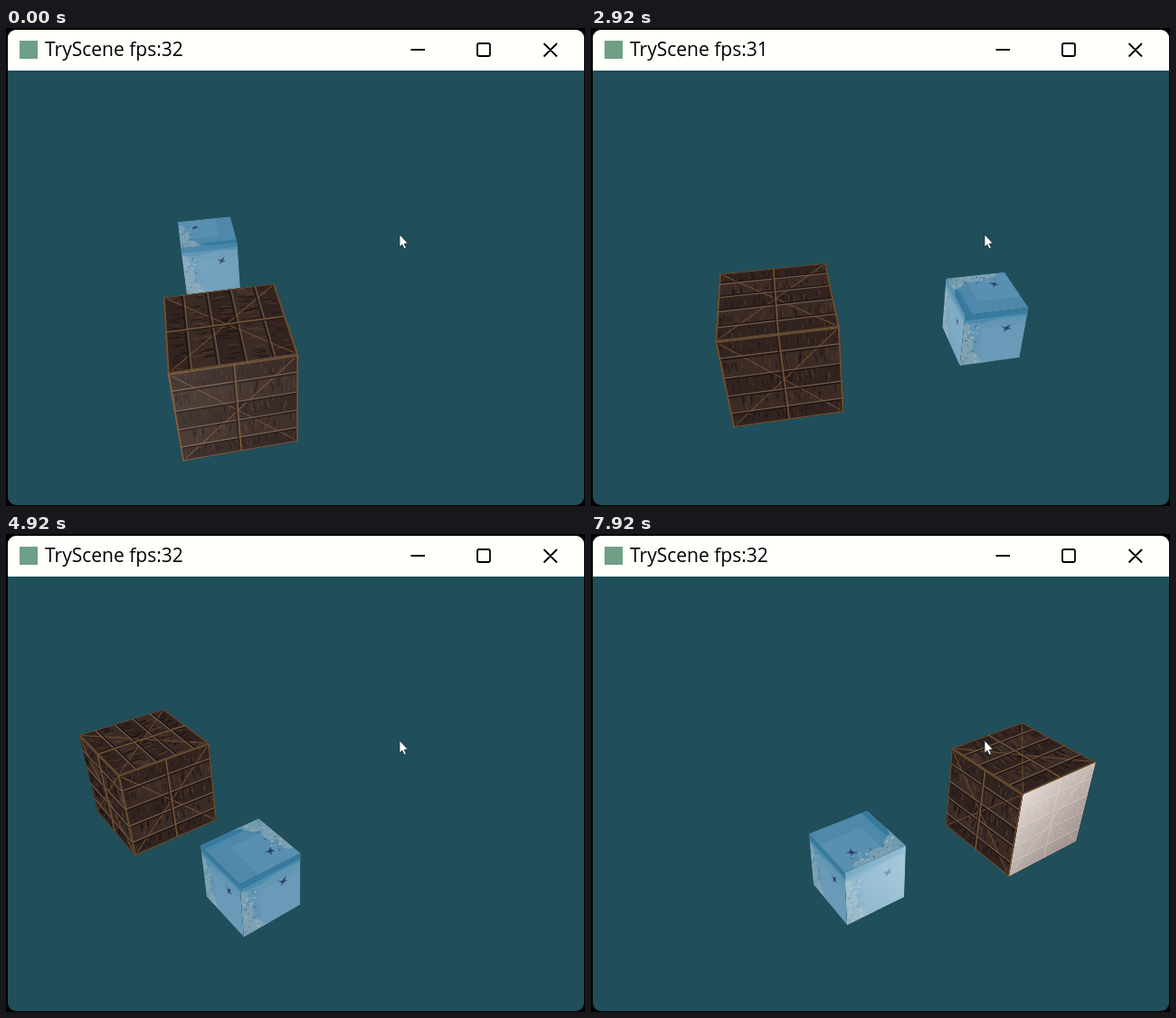
An HTML page with a canvas for the animation above (8000 ms loop, 640 by 528 pixels).

```html
<!DOCTYPE html>
<html lang="en">
<head>
<meta charset="utf-8">
<title>TryScene</title>
<style>
html, body { margin: 0; width: 100%; height: 100%; overflow: hidden; background: #000; }
canvas { display: block; width: 640px; height: 528px; }
</style>
</head>
<body>
<canvas id="stage" width="640" height="528"></canvas>
<script>
const ctx = document.getElementById('stage').getContext('2d');
const LOOP = 8000, STEP = LOOP / 96, RAD = Math.PI / 180;

// Camera: fixed pitch and height, turning steadily around the boxes
const FOCAL = 636, CX = 320, CY = 287, CAM_H = 3.53;
const SIN = Math.sin(34.7 * RAD), COS = Math.cos(34.7 * RAD);
const TURN_START = 167.5, TURN_RATE = 31.4;
const BOXES = [{ side: 1.02, offset: 1, wood: true }, { side: 0.62, offset: -1, wood: false }];

// Sideways and depth position of the scene centre: [seconds, value]
const SIDE = [[0, -.8], [.9, .2], [1.83, .34], [2.5, .3], [2.92, .04], [4.17, -.32],
  [4.92, -1.01], [6.17, .47], [7.92, .62], [8, .62]];
const DEPTH = [[0, 4.8], [.92, 4.87], [1.83, 4.58], [2.92, 4.38], [4.17, 4.36],
  [4.92, 4.6], [6.17, 4.74], [7.92, 4.5], [8, 4.48]];

// Monotone cubic through the keys
function track(keys, t) {
  let i = 0;
  while (i < keys.length - 2 && t >= keys[i + 1][0]) i++;
  const slope = k => (keys[k + 1][1] - keys[k][1]) / (keys[k + 1][0] - keys[k][0]);
  const tangent = k => {
    if (k === 0) return slope(0);
    if (k === keys.length - 1) return slope(k - 1);
    const a = slope(k - 1), b = slope(k);
    return a * b <= 0 ? 0 : 2 * a * b / (a + b);
  };
  const [t0, p0] = keys[i], [t1, p1] = keys[i + 1], d = t1 - t0;
  const s = (t - t0) / d, s2 = s * s, s3 = s2 * s;
  return p0 * (2 * s3 - 3 * s2 + 1) + p1 * (3 * s2 - 2 * s3)
    + d * (tangent(i) * (s3 - 2 * s2 + s) + tangent(i + 1) * (s3 - s2));
}

function random(seed) {
  return () => (seed = (seed * 16807) % 2147483647) / 2147483647;
}

const heading = deg => [Math.sin(deg * RAD), Math.cos(deg * RAD)];

function project(x, y, z) {
  const d = z * COS - y * SIN;
  return [CX + FOCAL * x / d, CY - FOCAL * (y * COS + z * SIN) / d];
}

function trace(at, pts) {
  ctx.beginPath();
  for (const [u, v] of pts) ctx.lineTo(...at(u, v));
  ctx.closePath();
}

function shape(at, pts, color) {
  trace(at, pts);
  ctx.fillStyle = color;
  ctx.fill();
}

function line(at, u0, v0, u1, v1, color, width = 1) {
  ctx.beginPath();
  ctx.moveTo(...at(u0, v0));
  ctx.lineTo(...at(u1, v1));
  ctx.strokeStyle = color;
  ctx.lineWidth = width;
  ctx.stroke();
}

const box = (u0, v0, u1, v1) => [[u0, v0], [u1, v0], [u1, v1], [u0, v1]];
const WHOLE = box(0, 0, 1, 1);
const ROWS = [0.02, 0.18, 0.4, 0.61, 0.82, 0.98];

const rndGrain = random(71);
const GRAIN = Array.from({ length: 170 }, () => {
  const row = Math.floor(rndGrain() * 5), h = ROWS[row + 1] - ROWS[row];
  const v = ROWS[row] + h * rndGrain() * 0.5;
  return { u: 0.03 + rndGrain() * 0.94, v, end: v + h * (0.2 + rndGrain() * 0.3), tone: rndGrain() };
});

function woodFace(at) {
  shape(at, WHOLE, '#3a2b25');
  for (let i = 0; i < 5; i += 2) shape(at, box(0, ROWS[i], 1, ROWS[i + 1]), 'rgba(20,13,12,.25)');
  for (const g of GRAIN) {
    const color = g.tone < 0.55 ? 'rgba(22,15,14,.5)' : 'rgba(98,72,58,.45)';
    line(at, g.u, g.v, g.u, g.end, color, 1.3);
  }
  line(at, 0.03, 0.03, 0.97, 0.97, '#67492f', 1.2);
  line(at, 0.97, 0.03, 0.03, 0.97, '#67492f', 1.2);
  for (const v of ROWS.slice(1, 5)) {
    line(at, 0, v + 0.018, 1, v + 0.018, '#1d1413', 1.3);
    line(at, 0, v, 1, v, '#775d4b', 1.1);
  }
  line(at, 0.485, 0, 0.485, 1, '#241917', 1.2);
  line(at, 0.5, 0, 0.5, 1, '#765638', 1.5);
  for (const b of [box(0, 0, 1, .015), box(0, .985, 1, 1), box(0, 0, .015, 1), box(.985, 0, 1, 1)]) {
    shape(at, b, '#72502f');
  }
}

const rndFoam = random(19);
const FOAM = [[0, 0.16]];
for (let i = 0; i <= 14; i++) {
  const s = i / 14;
  FOAM.push([0.05 + 0.13 * rndFoam() + 0.28 * s ** 5, 0.16 + 0.8 * s]);
}
FOAM.push([0.5, 1], [0, 1]);
const SPECKS = Array.from({ length: 22 }, () => {
  const v = 0.2 + rndFoam() * 0.75;
  return { u: 0.02 + rndFoam() * 0.2, v, w: 0.02 + rndFoam() * 0.06, h: 0.02 + rndFoam() * 0.04, tone: rndFoam() };
});
const BIRD = [[-.1, -.05], [-.02, -.01], [.07, -.08], [.05, .01], [.1, .04], [.02, .05], [-.04, .1], [-.03, .03]];

function iceFace(at, isTop) {
  shape(at, WHOLE, isTop ? '#5088aa' : '#6496b4');
  shape(at, box(0, 0, 1, 0.11), '#377a9e');
  shape(at, [[0, .11], [1, .09], [1, .15], [.6, .14], [.3, .19], [0, .16]], 'rgba(70,138,172,.8)');
  shape(at, box(0.3, 0.3, 1, 1), 'rgba(126,172,198,.2)');
  const foamAt = isTop ? (u, v) => at(1 - u, 1 - v) : at;
  shape(foamAt, FOAM, 'rgba(134,164,178,.75)');
  for (const s of SPECKS) {
    const color = s.tone < 0.5 ? 'rgba(62,102,128,.7)' : 'rgba(178,192,196,.7)';
    shape(foamAt, [[s.u, s.v], [s.u + s.w, s.v + s.h * .4], [s.u + s.w * .4, s.v + s.h]], color);
  }
  const bu = 0.69, bv = isTop ? 0.7 : 0.34;
  shape(at, BIRD.map(([u, v]) => [bu + u * .85, bv + v * .85]), '#3a5580');
  shape(at, BIRD.map(([u, v]) => [bu + u * .45, bv + v * .45]), '#283558');
}

// Highlight from how closely the reflected light meets the eye
function glint(normal, light, x, z) {
  const view = 180 + Math.atan2(x, z) / RAD;
  const off = ((2 * normal - light - view) % 360 + 540) % 360 - 180;
  return Math.exp(-Math.pow(Math.abs(off) / 22, 1.5));
}

// The highlight fades from the brighter top corner to the opposite bottom one
function shine(at, wood, [left, right]) {
  const near = left > right ? 0 : 1;
  const g = ctx.createLinearGradient(...at(near, 0), ...at(1 - near, 1));
  const tint = wood ? '244,234,229' : '224,243,252';
  const alpha = s => wood ? 0.92 * s : 0.85 * s ** 0.8;
  g.addColorStop(0, `rgba(${tint},${alpha(Math.max(left, right))})`);
  g.addColorStop(1, `rgba(${tint},${alpha(Math.min(left, right)) * 0.7})`);
  shape(at, WHOLE, g);
}

function paintFace(b, at, isTop, light) {
  ctx.save();
  trace(at, WHOLE);
  ctx.clip();
  if (b.wood) woodFace(isTop ? (u, v) => at(v, u) : at);
  else iceFace(at, isTop);
  if (light) shine(at, b.wood, light);
  ctx.restore();
}

function paintBox(b, turn) {
  const { x, z, side } = b, top = -CAM_H + side / 2;
  for (let j = 0; j < 4; j++) {
    const normal = turn + 90 * j;
    const n = heading(normal), r = heading(normal - 90);
    const fx = x + n[0] * side / 2, fz = z + n[1] * side / 2;
    if (n[0] * fx + n[1] * fz >= 0) continue;
    const ground = u => [fx + r[0] * (u - .5) * side, fz + r[1] * (u - .5) * side];
    const at = (u, v) => {
      const [px, pz] = ground(u);
      return project(px, top - v * side, pz);
    };
    const facing = j < 2; // the other two sides face away from the lamp
    const light = facing && [0, 1].map(u => glint(normal, turn + 39, ...ground(u)));
    paintFace(b, at, false, light);
  }
  const f = heading(turn), r = heading(turn + 90);
  const at = (u, v) => project(
    x + side * (f[0] * (.5 - v) + r[0] * (u - .5)), top,
    z + side * (f[1] * (.5 - v) + r[1] * (u - .5)));
  paintFace(b, at, true, null);
}

function paintScene(t) {
  const turn = TURN_START + TURN_RATE * t, dir = heading(turn);
  const mx = track(SIDE, t), mz = track(DEPTH, t);
  const placed = BOXES.map(b => ({ ...b, x: mx + dir[0] * b.offset, z: mz + dir[1] * b.offset }));
  placed.sort((a, b) => b.z - a.z).forEach(b => paintBox(b, turn));
}

function paintBar(t) {
  ctx.fillStyle = '#fffffc';
  ctx.fillRect(0, 0, 640, 47);
  ctx.fillStyle = '#6f9f86';
  ctx.fillRect(15, 14, 20, 20);
  const fps = (t >= 2 && t < 4) || (t >= 5 && t < 6) ? 31 : 32;
  ctx.fillStyle = '#000';
  ctx.font = '21px "Open Sans", "Noto Sans", sans-serif';
  ctx.fillText('TryScene fps:' + fps, 43, 31);
  ctx.strokeStyle = '#000';
  ctx.lineWidth = 1.8;
  ctx.beginPath();
  ctx.moveTo(447.5, 24);
  ctx.lineTo(463, 24);
  ctx.roundRect(521, 17, 14, 14, 2);
  ctx.moveTo(594.5, 17);
  ctx.lineTo(609, 31.5);
  ctx.moveTo(609, 17);
  ctx.lineTo(594.5, 31.5);
  ctx.stroke();
}

function paintCursor() {
  const at = (x, y) => [435 + x, 228 + y];
  shape(at, [[0, 0], [0, 14], [3, 11.2], [5.2, 16], [7.4, 15], [5.2, 10.3], [9.3, 10]], '#fff');
  ctx.strokeStyle = '#1a2a30';
  ctx.lineWidth = 0.8;
  ctx.stroke();
}

function frame(now) {
  const ms = now % LOOP;
  const t = (Math.floor((ms + 5) / STEP) % 96) * STEP / 1000;
  ctx.fillStyle = '#000';
  ctx.fillRect(0, 0, 640, 528);
  ctx.save();
  ctx.beginPath();
  ctx.roundRect(2, 2, 637, 525, 9);
  ctx.clip();
  ctx.fillStyle = '#204e5a';
  ctx.fillRect(0, 0, 640, 528);
  paintScene(t);
  paintBar(t);
  paintCursor();
  ctx.restore();
  requestAnimationFrame(frame);
}
requestAnimationFrame(frame);
</script>
</body>
</html>
```
